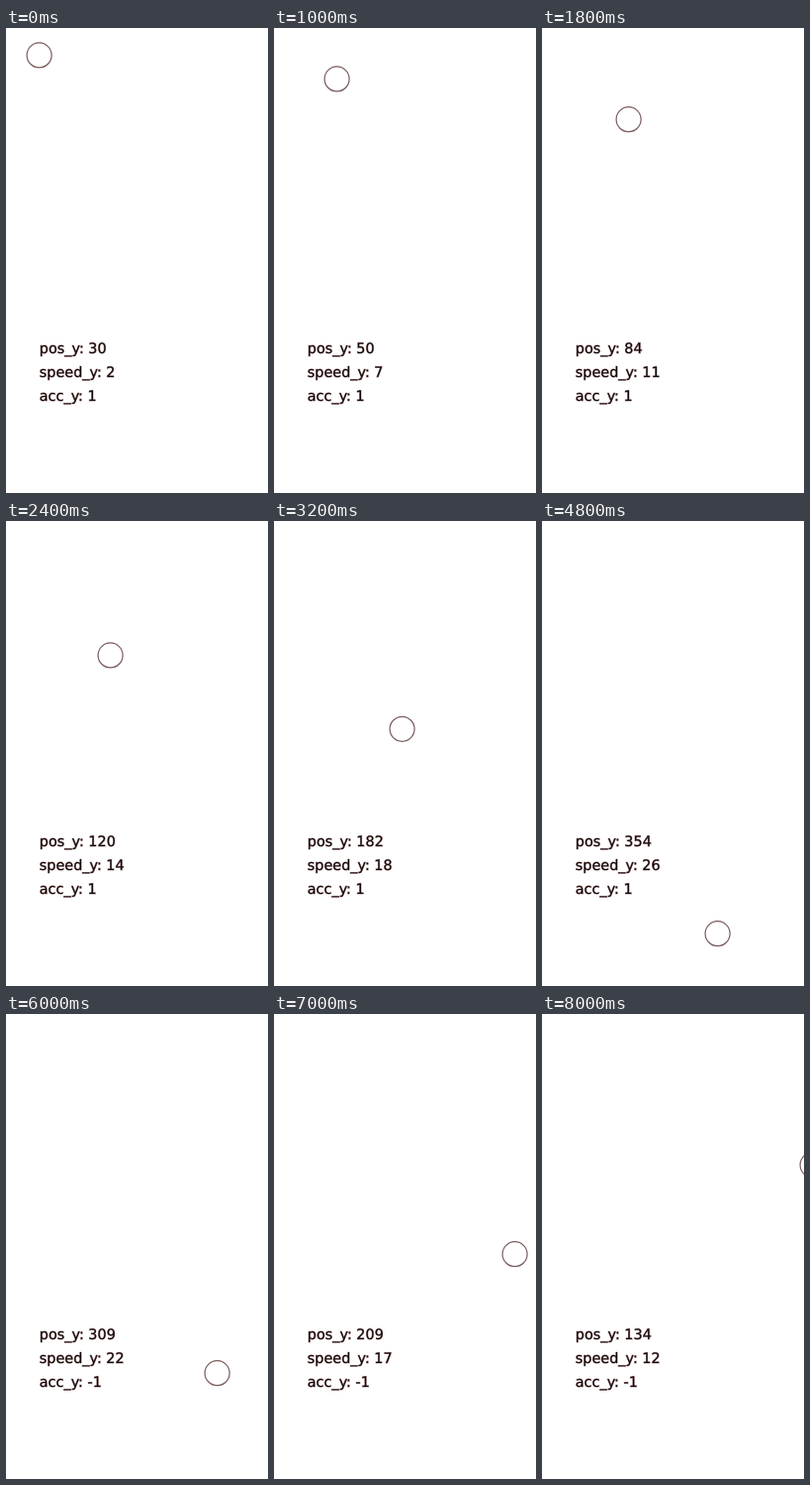
Write an HTML page that moves like this. It is 265 px wide and 469 px high and loops after 8.2 s.

```html
<!DOCTYPE html>
<html lang="en">
<head>
<meta charset="utf-8">
<title>Bouncing ball</title>
<style>
  html, body { margin: 0; width: 100%; height: 100%; overflow: hidden; background: #fff; }
  svg { display: block; width: 265px; height: 469px; }
  text {
    font: 14.4px "DejaVu Sans", sans-serif;
    text-rendering: geometricPrecision;
    white-space: pre;
    fill: #100808;
    stroke: #a58080;
    stroke-width: 0.8;
    paint-order: stroke;
  }
  circle { fill: none; stroke: #795a5a; stroke-width: 1.2; }
</style>
</head>
<body>
<svg viewBox="0 0 265 469">
  <circle id="ball" r="12.5"/>
  <text id="pos" x="33.8" y="327.5"></text>
  <text id="speed" x="33.8" y="351.5"></text>
  <text id="acc" x="33.8" y="375.5"></text>
</svg>
<script>
  const STEP = 200, STEPS = 41, FLOOR = 400;
  const [ball, posText, speedText, accText] =
    ["ball", "pos", "speed", "acc"].map(id => document.getElementById(id));

  // Falls faster each step, then rises from the floor while slowing down.
  function simulate(n) {
    let pos = 30, speed = 2, acc = 1;
    for (let i = 0; i < n; i++) {
      pos += acc * speed;
      if (pos >= FLOOR) acc = -1;
      speed += acc;
    }
    return { pos, speed, acc };
  }

  let shown = -1;
  function draw(n) {
    const { pos, speed, acc } = simulate(n);
    ball.setAttribute("cx", 33.6 + 6 * n);
    ball.setAttribute("cy", 1.2 * pos - 8.6);
    posText.textContent = `pos_y: ${pos}`;
    speedText.textContent = `speed_y: ${speed}`;
    accText.textContent = `acc_y: ${acc}`;
    shown = n;
  }

  const start = performance.now();
  function tick() {
    const n = Math.floor((performance.now() - start) / STEP) % STEPS;
    if (n !== shown) draw(n);
    requestAnimationFrame(tick);
  }
  tick();
</script>
</body>
</html>
```
